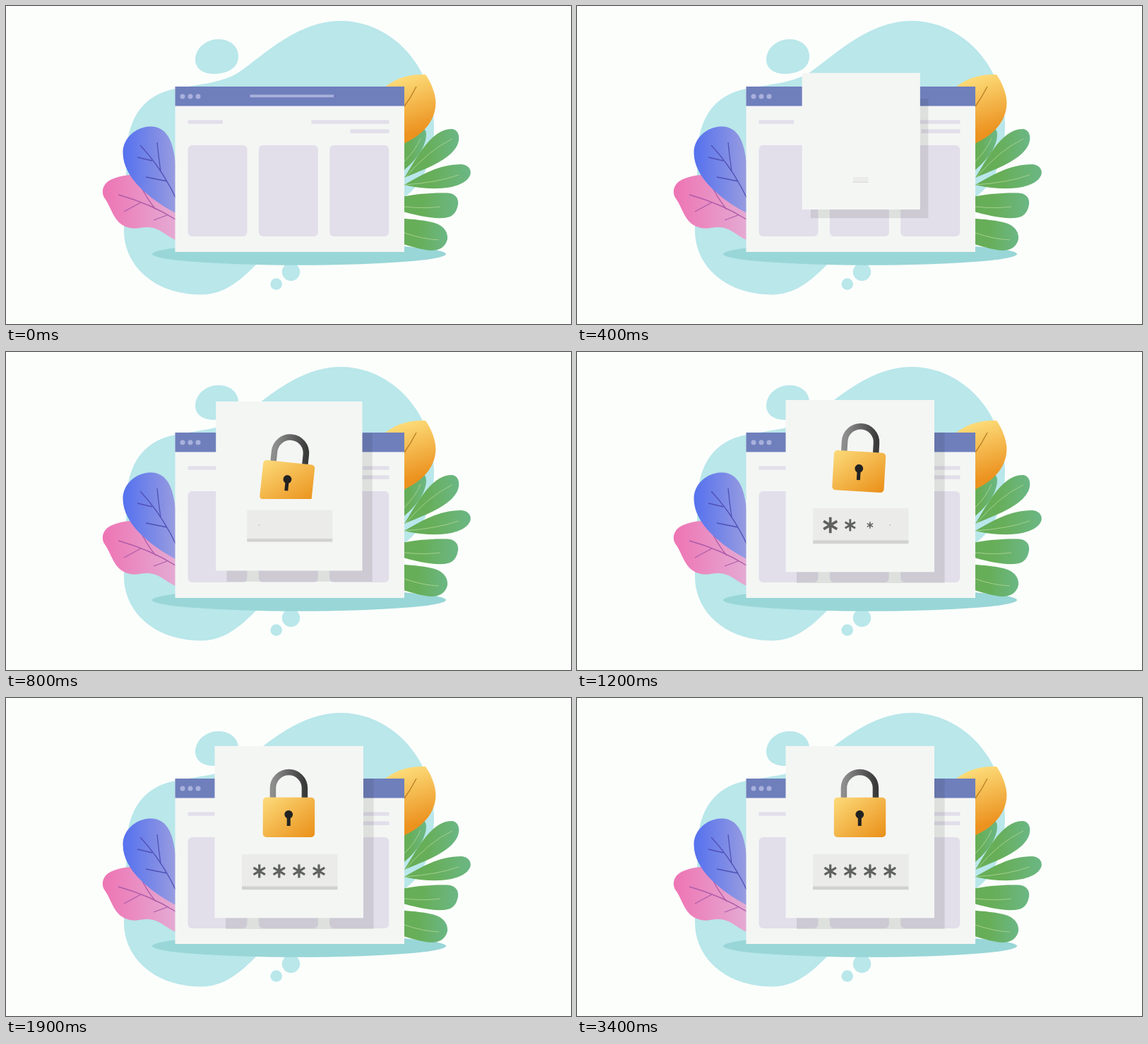
Animation, 800 px wide and 450 px high, one loop 3.8 s. Source, as an HTML page:

```html
<!DOCTYPE html>
<html lang="en">
<head>
<meta charset="utf-8">
<title>Locked window</title>
<style>
  html, body { margin: 0; width: 100%; height: 100%; overflow: hidden; background: #fcfefc; }
  svg { display: block; width: 100vw; height: 100vh; }
</style>
</head>
<body>
<svg viewBox="0 0 800 450">
  <defs>
    <linearGradient id="pink"><stop stop-color="#ee74b4"/><stop offset="1" stop-color="#e4add5"/></linearGradient>
    <linearGradient id="blue"><stop offset=".05" stop-color="#5873ee"/><stop offset="1" stop-color="#989ce0"/></linearGradient>
    <linearGradient id="orange" x1=".35" y1="0" x2=".6" y2="1"><stop stop-color="#fde07e"/><stop offset=".85" stop-color="#ec921f"/></linearGradient>
    <linearGradient id="green"><stop offset=".4" stop-color="#67ae58"/><stop offset="1" stop-color="#6bb785"/></linearGradient>
    <linearGradient id="gold" x1="0" y1="0" x2="1" y2="1"><stop stop-color="#fcdb7b"/><stop offset="1" stop-color="#ea8f17"/></linearGradient>
    <linearGradient id="steel"><stop stop-color="#8e8e8e"/><stop offset="1" stop-color="#3a3a3a"/></linearGradient>
    <clipPath id="slot"><path d="M340 70H460V208H340Z"/></clipPath>
  </defs>

  <rect width="800" height="450" fill="#fcfefc"/>
  <g fill="#b9e7ea">
    <path d="M474 21C541 21 606 80 606 168C606 232 580 268 545 280L400 330C378 345 368 354 354 366C330 390 309 408 276 408.500C208 408 167 366 167 318C167 275 171 240 171 205C173 160 193 126 240 117C280 110 308 108 331 93C362 72 412 21 474 21Z"/>
    <path d="M301 47C318 47 329 58 329 71C329 87 315 96 294 96C277 96 268 87 268 76C268 60 283 47 301 47Z"/>
    <circle cx="403.500" cy="376.300" r="12.700"/>
    <circle cx="382.700" cy="393.500" r="8.300"/>
  </g>
  <ellipse cx="415" cy="351" rx="208" ry="15.700" fill="#99d6d7"/>

  <path fill="url(#pink)" d="M240 331C226 325 217 313 200 313C191 313 185 316 175 314C152 309 150 285 139 271C134 262 138 251 148 246C161 240 175 238 190 239L245 262V331Z"/>
  <g fill="none" stroke="#ae5ba8" stroke-width="1.300">
    <path d="M159 267Q205 280 240 302M167 291L191 278M190 253Q199 272 212 288M209 303L228 296"/>
  </g>
  <path fill="url(#blue)" d="M204 170.500C229 170 237 194 240 222V293C212 278 166 247 165.500 208C165 188 183 171 204 170.500Z"/>
  <g fill="none" stroke="#4f50b5" stroke-width="1.300">
    <path d="M190 197Q220 229 240 271M186 214L207 219M214 193Q216 214 219 234M198 242L228 248"/>
  </g>

  <g fill="url(#green)">
    <path d="M555 240V195C568 181 583 172 592 174C599 179 593 200 583 212C577 220 570 227 555 240Z"/>
    <path d="M564 243C578 222 600 174 631 174C641 175 644 186 639 197C628 219 592 231 564 243Z"/>
    <path d="M564 253C587 240 612 224 645 224C655 225 660 232 657 240C648 259 605 263 564 253Z"/>
    <path d="M555 271C578 266 603 264 624 264.500C638 265 641 274 640 281C638 292 633 299 620 300C600 301 580 296 555 289Z"/>
    <path d="M555 300C577 302 596 303 610 308C622 313 626 322 625 330C622 342 613 346 602 346C588 345 574 340 555 335Z"/>
  </g>
  <g fill="none" stroke="#a4d08c" stroke-width="1">
    <path d="M564 220Q580 204 587 187M566 242Q598 204 632 188M564 253Q610 250 641 239M564 284Q592 287 615 284M564 321Q590 330 613 331"/>
  </g>
  <path fill="url(#orange)" d="M530 120C549 102 570 96 594 97C601 107 608 122 608.500 137C608 165 588 184 560 196Z"/>
  <path d="M581 114Q573 130 562 145" fill="none" stroke="#b87d25" stroke-width="1.300"/>

  <path fill="#f4f6f4" d="M239.500 114H564V348H239.500Z"/>
  <path fill="#6f7fbc" d="M239.500 114H564V141.500H239.500Z"/>
  <g fill="#a8b0dc">
    <circle cx="250" cy="128" r="3.500"/><circle cx="261" cy="128" r="3.500"/><circle cx="272" cy="128" r="3.500"/>
    <path d="M345.500 125.500H464V129.300H345.500Z"/>
  </g>
  <g fill="#e2deea">
    <path d="M257.500 161.500H307V166.700H257.500ZM432.500 161.500H542.500V166.700H432.500ZM487.500 174.500H542.500V180H487.500Z"/>
    <rect x="257.500" y="197" width="84" height="129" rx="6"/>
    <rect x="357.800" y="197" width="84" height="129" rx="6"/>
    <rect x="458.200" y="197" width="84" height="129" rx="6"/>
  </g>

  <g id="popup">
    <path fill="#1c241c" opacity=".1" d="M311 114H520.500V327H311Z"/>
    <path fill="#f4f6f4" d="M295.500 68H506V311.300H295.500Z"/>
  </g>
  <g id="field">
    <path fill="#ebebea" d="M334 221H469.500V267H334Z"/>
    <path fill="#d1d2d0" d="M334 266.500H469.500V271.300H334Z"/>
  </g>
  <g id="stars" fill="none" stroke="#5f625f" stroke-width="3.200"></g>
  <g clip-path="url(#slot)">
    <g id="lock">
      <path d="M377.900 145V127.500A22.500 22.500 0 0 1 422.900 127.500V145" fill="none" stroke="url(#steel)" stroke-width="8.500"/>
      <rect x="363.800" y="140.700" width="73.400" height="56.300" rx="5" fill="url(#gold)"/>
      <circle cx="400.300" cy="164.800" r="5.900" fill="#222"/>
      <path d="M397.800 165H402.800V181H397.800Z" fill="#222"/>
    </g>
  </g>
</svg>
<script>
  const LOOP = 3800, STEP = 100;
  const byId = id => document.getElementById(id);
  const clamp = v => Math.min(1, Math.max(0, v));
  const easeOut = (t, start, length) => 1 - Math.pow(1 - clamp((t - start) / length), 4.1);
  const scaleAt = (x, y, s) => `translate(${x} ${y}) scale(${s}) translate(${-x} ${-y})`;

  const popup = byId('popup'), field = byId('field'), lock = byId('lock');
  const stars = [0, 1, 2, 3].map(() => {
    const star = document.createElementNS('http://www.w3.org/2000/svg', 'path');
    star.setAttribute('d', 'M0 -9.600V9.600M-8.200 -4.800L8.200 4.800M-8.200 4.800L8.200 -4.800');
    byId('stars').append(star);
    return star;
  });

  // Grows past full size, then settles back.
  function pop(age) {
    if (age <= 0) return 0;
    if (age < 450) return 1.2 * (1 - Math.pow(1 - age / 450, 1.3));
    return 1.1 + 0.1 * Math.cos(Math.PI * clamp((age - 450) / 250));
  }

  function draw(t) {
    const rise = easeOut(t, 356, 1056);
    const tilt = 6 * Math.pow(Math.max(0, 2000 - t) / 1200, 1.5);
    popup.setAttribute('transform', scaleAt(408, 197.5, easeOut(t, 0, 1250)));
    field.setAttribute('transform', scaleAt(401.7, 246, rise));
    lock.setAttribute('transform', `translate(0 ${145 * (1 - rise)}) rotate(${tilt} 400.5 147)`);
    lock.setAttribute('visibility', rise > 0 ? 'visible' : 'hidden');
    stars.forEach((star, i) => star.setAttribute('transform',
      `translate(${358.7 + 28.1 * i} 245) scale(${pop(t - 780 - 133 * i)})`));
  }

  const begin = performance.now();
  function tick() {
    const t = (performance.now() - begin) % LOOP;
    draw(Math.floor(t / STEP) * STEP);
    requestAnimationFrame(tick);
  }
  draw(0);
  requestAnimationFrame(tick);
</script>
</body>
</html>
```
